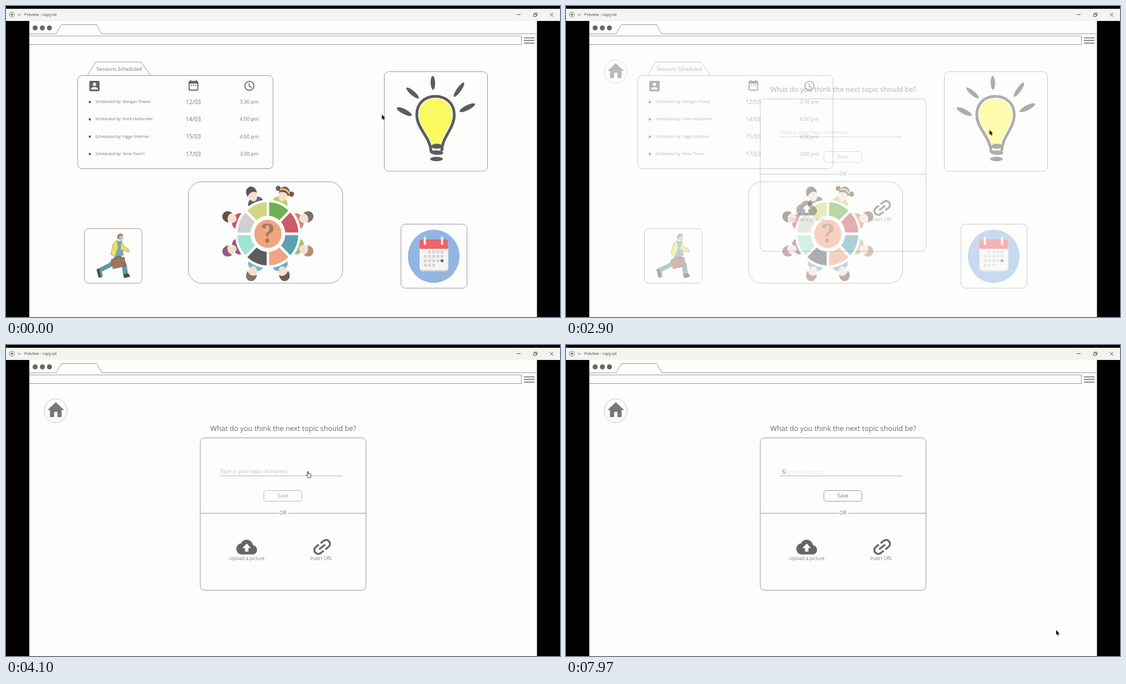
Animation, 998 px wide and 561 px high, one loop 8000 ms. Source, as an HTML page:

```html
<!DOCTYPE html>
<html lang="en">
<head>
<meta charset="utf-8">
<title>Prototype preview</title>
<style>
  html, body { margin: 0; width: 100%; height: 100%; overflow: hidden; background: #000; }
  svg { display: block; width: 100vw; height: 100vh; font-family: "Open Sans", "Noto Sans", sans-serif; }
  .line { fill: none; stroke: #9494a8; }
  .card { fill: #fdfdfc; stroke: #9898a4; }
  .ink { fill: #666; }
  .anim { animation: 8s linear infinite both; }

  #home { animation-name: home; }
  #topic { animation-name: topic; }
  .hover { animation-name: hover; }
  #hint { animation-name: hint; }
  #caret { animation-name: caret; }
  #first { animation-name: first; }
  #rest { animation-name: rest; }
  #save { animation-name: save; }
  #cursor { animation-name: move; }
  #arrow { animation-name: arrow; animation-timing-function: step-end; }
  #hand { animation-name: hand; animation-timing-function: step-end; }

  @keyframes home {
    0%, 34.5% { opacity: 1; animation-timing-function: cubic-bezier(.2,.55,.5,1); }
    42%, 100% { opacity: 0; }
  }
  @keyframes topic {
    0%, 34.5% { opacity: 0; animation-timing-function: cubic-bezier(.2,.55,.5,1); }
    42%, 100% { opacity: 1; }
  }
  @keyframes hover {
    0%, 1.7% { opacity: 0; animation-timing-function: ease-out; }
    5.5%, 31.5% { opacity: 1; animation-timing-function: ease-out; }
    34%, 100% { opacity: 0; }
  }
  @keyframes hint {
    0%, 74.75% { opacity: 1; animation-timing-function: cubic-bezier(.2,.55,.5,1); }
    82.25%, 100% { opacity: 0; }
  }
  @keyframes caret {
    0%, 74.75% { opacity: 0; transform: none; animation-timing-function: cubic-bezier(.2,.55,.5,1); }
    82.25%, 86.9% { opacity: 1; transform: none; animation-timing-function: cubic-bezier(.2,.55,.5,1); }
    94.4%, 99.1% { opacity: 1; transform: translateX(6.5px); }
    100% { opacity: .5; transform: translateX(6.5px); }
  }
  @keyframes first {
    0%, 86.9% { fill-opacity: 0; animation-timing-function: cubic-bezier(.2,.55,.5,1); }
    94.4%, 100% { fill-opacity: 1; }
  }
  @keyframes rest {
    0%, 99.1% { fill-opacity: 0; }
    100% { fill-opacity: .26; }
  }
  @keyframes save {
    0%, 86.9% { opacity: .68; }
    94.4%, 100% { opacity: 1; }
  }
  @keyframes move {
    0%, .4% { transform: translate(677px,195.5px); animation-timing-function: ease-in-out; }
    9.5%, 32% { transform: translate(768px,225px); }
    33%, 42.1% { transform: translate(763px,223.5px); animation-timing-function: ease-in-out; }
    50.6%, 53.4% { transform: translate(544px,228px); animation-timing-function: ease-in-out; }
    62%, 63.8% { transform: translate(497px,229px); }
    64.6%, 74.6% { transform: translate(494px,227px); animation-timing-function: ease-in; }
    78.4% { transform: translate(684.5px,268.5px); animation-timing-function: ease-out; }
    83.7%, 95.9% { transform: translate(810px,393px); }
    99.6%, 100% { transform: translate(883px,514px); }
  }
  @keyframes hand {
    0% { opacity: 0; } 1.7% { opacity: 1; } 33% { opacity: 0; }
    47.4% { opacity: 1; } 77.4%, 100% { opacity: 0; }
  }
  @keyframes arrow {
    0% { opacity: 1; } 1.7% { opacity: 0; } 33% { opacity: 1; }
    47.4% { opacity: 0; } 77.4%, 100% { opacity: 1; }
  }
</style>
</head>
<body>
<svg viewBox="0 0 998 561" preserveAspectRatio="none">
  <!-- window and browser frame -->
  <rect width="998" height="561"/>
  <rect y="5" width="998" height="22" fill="#f4f3f0"/>
  <rect x="42" y="27" width="914.5" height="534" fill="#fdfdfc"/>
  <g fill="none" stroke="#555">
    <circle cx="10.5" cy="15.5" r="4.5" stroke="#777"/>
    <circle cx="10.5" cy="15.5" r="1.9" fill="#666" stroke="none"/>
    <path d="M21.5 14.5l2.5 2.5 2.5-2.5M920 15.5h7M950.5 14.5h4.5v4.5h-4.5zM952 14.5v-1.7h4.7v4.700h-1.700M979.500 12.500l6.500 6.500M986 12.500l-6.500 6.500"/>
  </g>
  <text x="33" y="18.400" font-size="7.340" fill="#444">Preview : copy.xd</text>
  <g class="ink"><circle cx="52.500" cy="39.500" r="4.500"/><circle cx="65.500" cy="39.500" r="4.500"/><circle cx="78.300" cy="39.500" r="4.500"/></g>
  <path class="line" d="M42 50H90L100 33.500H163L172.500 50H956M42 54H928.500V69.500H42z"/>
  <path d="M933 57.500h19M933 62h19M933 67h19" stroke="#8a8a8a" stroke-width="2"/>

  <g id="home" class="anim">
    <path class="line" d="M147 125L161.500 101H243L260.500 125"/>
    <rect class="line" x="129" y="125.500" width="352" height="168" rx="8"/>
    <text x="163" y="117.300" font-size="9" fill="#777">Sessions Scheduled</text>
    <g class="ink">
      <path transform="translate(147 132) scale(1.030)" d="M3 5v14c0 1.100.9 2 2 2h14c1.100 0 2-.9 2-2V5c0-1.100-.9-2-2-2H5c-1.100 0-2 .9-2 2zm12 4c0 1.660-1.340 3-3 3s-3-1.340-3-3 1.340-3 3-3 3 1.340 3 3zm-9 8c0-2 4-3.100 6-3.100s6 1.100 6 3.100v1H6v-1z"/>
      <path transform="translate(326 131.300) scale(.97)" d="M9 11H7v2h2zM13 11h-2v2h2zM17 11h-2v2h2zM19 4h-1V2h-2v2H8V2H6v2H5c-1.100 0-2 .9-2 2v14c0 1.100.9 2 2 2h14c1.100 0 2-.9 2-2V6c0-1.100-.9-2-2-2zm0 16H5V9h14z"/>
    </g>
    <g fill="none" stroke="#666" stroke-width="1.800"><circle cx="438.500" cy="144" r="8.200"/><path d="M438 139v5.500l4.200 2.500" stroke-width="1.500"/></g>
    <g id="rows"></g>

    <g class="anim hover">
      <rect x="692" y="131" width="186" height="179" rx="8" fill="#fdfc6a"/>
      <text x="708" y="327" font-size="14.200" fill="#8a8a8a">Suggest a new topic.</text>
    </g>
    <rect class="card" x="681.500" y="118.500" width="186" height="179.500" rx="8"/>
    <g id="bulb" fill="#5c5c5c"></g>

    <rect class="card" x="328.500" y="317" width="278" height="183" rx="24"/>
    <g id="wheel" transform="translate(471.800 411) scale(1 1.040)"></g>

    <rect class="card" x="141.500" y="401.500" width="103.500" height="98.500" rx="7"/>
    <g id="runner" stroke-linejoin="round" stroke-linecap="round">
      <path d="M202 452L188 467L168 477L170 486" fill="none" stroke="#6497a4" stroke-width="8"/>
      <path d="M203 452L213 467L215 482" fill="none" stroke="#6497a4" stroke-width="9"/>
      <path d="M163 475l5-1 3 15-4 1zM211 484l9-2 4 6-11 3z" fill="#4c4c50"/>
      <path d="M199 424l10 0 3 26-15 3z" fill="#7ba6b8"/>
      <path d="M200 422l-7 7-4 19 7 5 6-17zM208 423l4 10 9 6-2 5-13-5z" fill="#e8e070" stroke="#8d8950" stroke-width=".7"/>
      <path d="M217 440l5 0 1 4-7 0z" fill="#e2b79a"/>
      <ellipse cx="206.500" cy="417.500" rx="4.500" ry="5.700" fill="#e2b79a"/>
      <path d="M200 419q0-9 7-8.500 4 .5 4 4l-6 0-2 6z" fill="#8b8b8b"/>
      <path d="M190 457l23-4 2 16-22 5z" fill="#a5715f" stroke="#70503f" stroke-width=".7"/>
      <path d="M198 455l1-3 6-1 1 3" fill="none" stroke="#70503f"/>
    </g>

    <rect class="card" x="711.500" y="393.500" width="119" height="115.500" rx="8"/>
    <ellipse cx="770.500" cy="451.500" rx="46.500" ry="48" fill="#92b6e0"/>
    <rect x="745" y="424" width="52" height="55" rx="5" fill="#c9ced4"/>
    <rect x="745" y="421" width="51.500" height="55.500" rx="5" fill="#f5f4f2"/>
    <path d="M745 438v-12q0-5 5-5h41.500q5 0 5 5v12z" fill="#ea6665"/>
    <path d="M754.500 418v11M785.500 418v11" stroke="#eee" stroke-width="4" stroke-linecap="round"/>
    <g id="days"></g>
  </g>

  <g id="topic" class="anim">
    <ellipse cx="89.500" cy="118.500" rx="20.500" ry="21.500" fill="#fdfdfc" stroke="#b5b5bd" stroke-width=".8"/>
    <path transform="translate(71.700 98.400) scale(1.500 1.580)" d="M10 20v-6h4v6h5v-8h3L12 3 2 12h3v8z" fill="#777"/>
    <text x="368" y="155.200" font-size="12.850" fill="#6c6c6c">What do you think the next topic should be?</text>
    <rect class="line" x="350" y="167.500" width="298.500" height="275" rx="8"/>
    <path class="line" d="M350 303.500H490.500M508 303.500H648"/>
    <path class="line" d="M384.500 236H606" stroke-opacity=".75"/>
    <text x="492.500" y="306.300" font-size="9.300" fill="#777">OR</text>
    <text id="hint" class="anim" x="386" y="231" font-size="9.070" fill="#bdbdbd">Type in your topic of interest</text>
    <text x="389" y="231.800" font-size="9" fill="#666"><tspan id="first" class="anim">S</tspan><tspan id="rest" class="anim">ummer Holidays</tspan></text>
    <path id="caret" class="anim" d="M388.500 222v11.500" stroke="#999"/>
    <g id="save" class="anim">
      <rect class="line" x="464.500" y="262.500" width="68.500" height="19.500" rx="5"/>
      <text x="489" y="275.200" font-size="9.200" fill="#777">Save</text>
    </g>
    <g class="ink">
      <path transform="translate(415 344.600) scale(1.550 1.660)" d="M19.350 10.040C18.670 6.590 15.640 4 12 4 9.110 4 6.600 5.640 5.350 8.040 2.340 8.360 0 10.910 0 14c0 3.310 2.690 6 6 6h13c2.760 0 5-2.240 5-5 0-2.640-2.050-4.780-4.650-4.960zM14 13v4h-4v-4H7l5-5 5 5z"/>
    </g>
    <g transform="translate(569.500 364.300) rotate(-38)" fill="none" stroke="#666" stroke-width="3.400">
      <path d="M-2 -7H-9A7 7 0 0 0 -9 7H-2M2 -7H9A7 7 0 0 1 9 7H2M-7 0H7"/>
    </g>
    <g fill="#808080">
      <text x="402" y="388" font-size="8.290">Upload a picture</text>
      <text x="548" y="388" font-size="8.200">Insert URL</text>
    </g>
  </g>

  <g id="cursor" class="anim">
    <path id="arrow" class="anim" d="M0 0V9l2-1.800 1.500 3.300 1.400-.6-1.500-3.200h2.800z" fill="#111"/>
    <path id="hand" class="anim" d="M-1 1Q0-.5 1 1V4.500Q4 4 5.200 5.500V8.500L4 11.300H-.2L-3 7.500Q-2.800 6-1 7.200Z" fill="#fff" stroke="#222"/>
  </g>
</svg>
<script>
  const fill = (id, parts) => document.getElementById(id).innerHTML = parts.join('');

  const sessions = [
    ['Morgan Thavel', '12/03', '3:30 pm'],
    ['Nora Hedlunder', '14/03', '4:00 pm'],
    ['Viggo Stellmar', '15/03', '4:00 pm'],
    ['Ilena Tiverri', '17/03', '3:00 pm']
  ];
  fill('rows', sessions.map(([name, date, time], i) => {
    const y = 173 + i * 31.2;
    return `<circle class="ink" cx="151" cy="${y + .3}" r="2.2"/><g fill="#777">
      <text x="161" y="${y + 2.2}" font-size="7.28">Scheduled by: ${name}</text>
      <text x="324" y="${y + 4}" font-size="10.2">${date}</text>
      <text x="421" y="${y + 3.2}" font-size="9">${time}</text></g>`;
  }));

  const ellipse = (x, y, rx, ry, turn = 0) =>
    `<ellipse rx="${rx}" ry="${ry}" transform="translate(${x} ${y}) rotate(${turn})"/>`;
  fill('bulb', [
    ellipse(769, 138.5, 4, 12.5, -2), ellipse(732.5, 157, 14.5, 4, 41),
    ellipse(816, 151, 15.5, 4, -55), ellipse(717.5, 190.5, 15, 4.5, 27),
    ellipse(831, 183.5, 15.5, 4.5, -27),
    `<path d="M766 264C765 236 740 222 740 196C740 175 755 163 773.500 163C793 163 807.500 176 807.500 196C807.500 222 785 236 785 262" fill="#fdfdfc" stroke="#5c5c5c" stroke-width="5"/>
     <path d="M767 250C764 233 744 217 744 197C744 178 757 167 773.500 167C790 167 803 179 803 197C803 217 785 233 783 250Z" fill="#fbf960"/>`,
    ellipse(776, 253, 10, 4.5), ellipse(776, 264.5, 12, 4, 4), ellipse(775.5, 276, 11.5, 4)
  ]);

  // segment, hair and clothing colours, clockwise from the top
  const seats = [
    ['#6fb054', '#73584f', '#c3cc62'], ['#cb5a6b', '#77706c', '#cf8d6a'],
    ['#5ba2b2', '#b48f72', '#a9bd72'], ['#efa583', '#6e5a54', '#6fb0c4'],
    ['#5c5c5c', '#84736a', '#78b5cb'], ['#a2e3d3', '#9a5b83', '#95588c'],
    ['#d0d0d0', '#62504c', '#c85662'], ['#d0d77f', '#58585c', '#5d6478']
  ];
  const person = ([, hair, cloth], i) => `<g transform="rotate(${22.5 + i * 45})">
    <ellipse cy="-58" rx="14" ry="10.500" fill="${cloth}"/>
    ${i ? '' : `<g fill="${hair}"><circle cx="-13" cy="-80" r="4.500"/><circle cx="13" cy="-80" r="4.500"/></g>`}
    <ellipse cy="-72.500" rx="8" ry="11" fill="#f4dfd0"/>
    <path d="M-9-73C-13-93 13-93 9-73C5-80-4-79-9-73Z" fill="${hair}"/>
    ${i ? '' : '<path d="M-9-79Q0-87 9-79" fill="none" stroke="#ead75c" stroke-width="2.500"/>'}</g>`;
  const segment = ([color], i) => `<path transform="rotate(${i * 45})" fill="${color}" stroke="#fdfdfc"
    stroke-width="4.500" d="M0-57A57 57 0 0 1 40.300-40.300L20.500-20.500A29 29 0 0 0 0-29Z"/>`;
  fill('wheel', [
    ...seats.map(person), ...seats.map(segment),
    `<circle r="31" fill="#fdfdfc"/><circle r="24.500" fill="#f0a581"/>
     <text y="15" font-size="45" font-weight="bold" text-anchor="middle" fill="#a5775c"
       style="font-family:'Noto Serif',serif">?</text>`
  ]);

  const days = [];
  for (let i = 1; i < 18; i++) {
    const x = 753 + i % 5 * 7.5, y = 441 + Math.floor(i / 5) * 8;
    days.push(`<rect x="${x}" y="${y}" width="5" height="5" fill="${i === 14 ? '#6b6b70' : '#d3d3d6'}"/>`);
  }
  fill('days', days);
</script>
</body>
</html>
```
